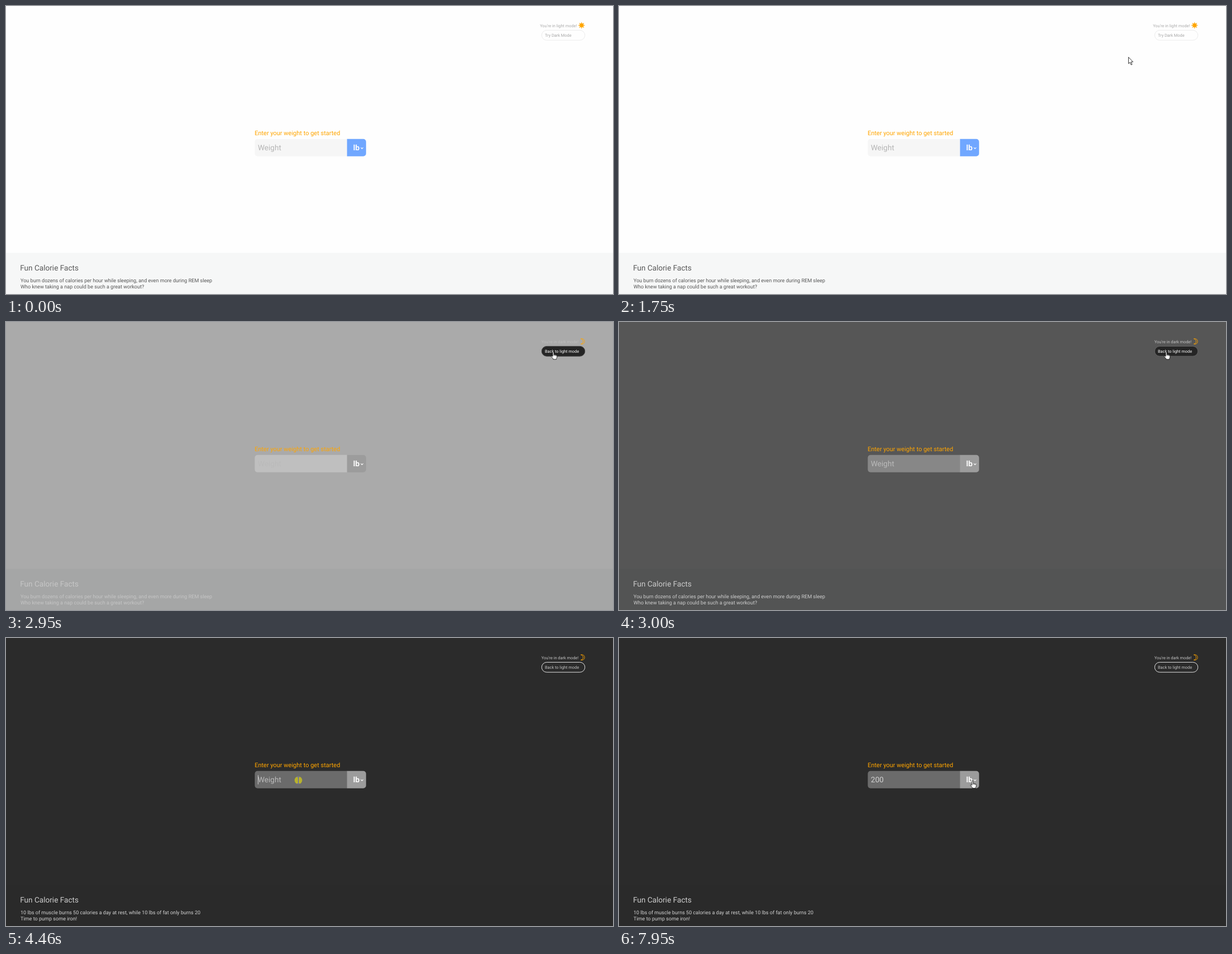
An HTML page that plays this animation: 1087 by 515 pixels, repeating every 8 s.

```html
<!DOCTYPE html>
<html lang="en">
<head>
<meta charset="utf-8">
<title>Calorie facts</title>
<style>
  html, body { margin: 0; width: 100%; height: 100%; overflow: hidden; background: #fefefe; }
  svg { display: block; width: 1087px; height: 515px; font-family: Roboto, sans-serif; text-rendering: geometricPrecision; }
  text { white-space: pre; }
  .small { font-size: 7.36px; }
  .body { font-size: 9.08px; }
  .big { font-size: 13.6px; }
  #beam { mix-blend-mode: difference; }
</style>
</head>
<body>
<svg viewBox="0 0 1087 515" xmlns="http://www.w3.org/2000/svg">
  <rect id="page" width="1087" height="515"/>
  <rect id="footer" y="441.5" width="1087" height="73.5"/>

  <text id="mode" class="small" y="37.5"></text>
  <g id="sun" fill="#ffa500" transform="translate(1030.8 34.6)">
    <circle r="3.5"/>
    <path id="rays"/>
  </g>
  <path id="moon" d="M1029.3 30Q1032.2 29.3 1034.4 30.9A5 5 0 0 1 1034.4 38.5Q1032.2 40.1 1029.3 39.4Q1033.4 38.4 1033.4 34.7T1029.3 30Z" fill="none" stroke="#ffa500" stroke-width=".9"/>
  <rect id="pill" x="959.3" y="43.4" width="77.4" height="17.8" rx="8.9"/>
  <text id="toggle" class="small" x="965" y="54.6"></text>

  <text x="445.2" y="230.9" font-size="11" fill="#ffa500">Enter your weight to get started</text>
  <path id="field" d="M611 237.7H450.5a5 5 0 0 0-5 5v21a5 5 0 0 0 5 5H611Z"/>
  <path id="unit" d="M610.7 237.7H639.8a5 5 0 0 1 5 5v21a5 5 0 0 1-5 5H610.7Z"/>
  <text id="value" class="big" x="451" y="258.1"></text>
  <rect id="caret" y="245.3" width=".9" height="16.4"/>
  <text class="big" x="621.8" y="258.1" font-weight="700" fill="#fff">lb</text>
  <path d="M635.4 253.2L637.5 255.2L639.6 253.2" fill="none" stroke="#fff" stroke-width="1.1"/>

  <text id="title" class="big" x="25.2" y="472.9">Fun Calorie Facts</text>
  <text id="fact1" class="body" x="26" y="494.1"></text>
  <text id="fact2" class="body" x="26" y="504.7"></text>

  <circle id="press" r="6.8" fill="#c8c21e" fill-opacity=".82"/>
  <path id="arrow" d="M0 0V11.6L2.6 9.2L4.6 13.7L6.4 12.9L4.5 8.5H8.1Z" fill="#fff" stroke="#000" stroke-width=".8"/>
  <g id="hand" stroke="#000" stroke-width=".75" stroke-linejoin="round">
    <path d="M-1 1Q-1 0 0 0T1.1 1V5Q2.3 4.2 3.2 5.3Q4.4 4.7 5.1 5.9Q6.6 5.6 6.7 7.2V9.4Q6.7 11 5.6 12.1V13.4H-.2V12.2L-3.4 8.6Q-4 7.2-2.6 7L-1 8.3Z" fill="#fff"/>
    <path d="M1.1 5V7M3.2 5.3V7.2M5.1 5.9V7.4" fill="none"/>
  </g>
  <path id="beam" d="M-2.4-6.2H-.8Q0-6.2 0-5.4Q0-6.2 .8-6.2H2.4M0-5.4V5.4M-2.4 6.2H-.8Q0 6.2 0 5.4Q0 6.2 .8 6.2H2.4" fill="none" stroke="#fff" stroke-width="1"/>
</svg>
<script>
const LOOP = 8000;
const el = {};
document.querySelectorAll('[id]').forEach(n => el[n.id] = n);

let rays = '';
for (let i = 0; i < 8; i++) {
  const a = i * Math.PI / 4;
  const at = (r, o) => (r * Math.cos(a + o)).toFixed(2) + ' ' + (r * Math.sin(a + o)).toFixed(2);
  rays += 'M' + at(3.9, -.27) + 'L' + at(6.2, 0) + 'L' + at(3.9, .27) + 'Z';
}
el.rays.setAttribute('d', rays);

// Pointer path: time, x, y
const path = [
  [230, 1024, 506], [620, 830, 384], [880, 662, 294], [1030, 594, 260],
  [1080, 576, 261], [1200, 541, 264], [1450, 680, 196], [1750, 911.8, 91.8],
  [1850, 933, 79], [2150, 964, 64], [2500, 979, 55], [2690, 980, 53.4],
  [3430, 980, 53.4], [3650, 860, 112], [3950, 588, 236], [4170, 522, 259],
  [4300, 522, 259], [4440, 523.5, 254.6], [4700, 523.6, 254.5], [4880, 525.2, 254],
  [6760, 525.2, 254], [7080, 546, 259], [7400, 561, 261],
  [7550, 561, 261], [7760, 612, 262], [7880, 634, 258.5], [7950, 633, 255.2]
];

const slope = (i, k) => {
  const a = path[i - 1], b = path[i], c = path[i + 1];
  if (!a || !c) return 0;
  const still = (p, q) => p[1] === q[1] && p[2] === q[2];
  return still(a, b) || still(b, c) ? 0 : (c[k] - a[k]) / (c[0] - a[0]);
};

function pointer(t) {
  const last = path.length - 1;
  if (t >= path[last][0]) return path[last].slice(1);
  let i = 0;
  while (t >= path[i + 1][0]) i++;
  const p = path[i], q = path[i + 1], dt = q[0] - p[0], u = (t - p[0]) / dt, v = 1 - u;
  return [1, 2].map(k =>
    p[k] * (1 + 2 * u) * v * v + q[k] * u * u * (3 - 2 * u) +
    dt * u * v * (slope(i, k) * v - slope(i + 1, k) * u));
}

// Same curve as the CSS "ease" keyword
function ease(x) {
  if (x <= 0) return 0;
  if (x >= 1) return 1;
  const bez = (s, a, b) => 3 * s * (1 - s) * ((1 - s) * a + s * b) + s ** 3;
  let lo = 0, hi = 1;
  for (let i = 0; i < 20; i++) {
    const mid = (lo + hi) / 2;
    if (bez(mid, .25, .25) < x) lo = mid; else hi = mid;
  }
  return bez(lo, .1, 1);
}

const within = (t, a, b) => t >= a && t < b;
const fade = (t, start) => ease((t - start) / 200);
const grey = v => `rgb(${v},${v},${v})`;
const mix = (a, b, p) => a + (b - a) * p;
const show = (n, on) => n.setAttribute('visibility', on ? 'visible' : 'hidden');
const fill = (n, c) => n.setAttribute('fill', c);
const say = (n, s) => { if (n.textContent !== s) n.textContent = s; };

const facts = [
  ['You burn dozens of calories per hour while sleeping, and even more during REM sleep',
   'Who knew taking a nap could be such a great workout?'],
  ['10 lbs of muscle burns 50 calories a day at rest, while 10 lbs of fat only burns 20',
   'Time to pump some iron!']
];

function render(t) {
  const dark = t >= 2900, d = fade(t, 2902);
  const hover = fade(t, 2200) * (1 - fade(t, 3470));

  fill(el.page, grey(mix(254, 43, d)));
  fill(el.footer, `rgb(${mix(246, 42, d)},${mix(247, 42, d)},${mix(247, 42, d)})`);
  fill(el.field, grey(mix(246, 107, d)));
  fill(el.unit, dark ? '#9c9c9c' : '#70a7ff');

  say(el.mode, dark ? "You're in dark mode!" : "You're in light mode!");
  el.mode.setAttribute('x', dark ? 958.8 : 956.2);
  fill(el.mode, dark ? grey(mix(184, 196, d)) : '#aaa');
  show(el.sun, !dark);
  show(el.moon, dark);

  fill(el.pill, '#252525');
  el.pill.setAttribute('fill-opacity', hover);
  el.pill.setAttribute('stroke', grey(mix(mix(236, 226, d), mix(34, 117, d), hover)));
  say(el.toggle, dark ? 'Back to light mode' : 'Try Dark Mode');
  fill(el.toggle, grey(mix(dark ? 196 : 165, 255, hover)));

  const typed = '200'.slice(0, (t >= 5760) + (t >= 5910) + (t >= 6090));
  say(el.value, typed || 'Weight');
  fill(el.value, typed ? '#d2d2d2' : dark ? '#bababa' : '#b5b5b5');
  el.caret.setAttribute('x', 451.1 + 7.637 * typed.length);
  fill(el.caret, '#d8d8d8');
  show(el.caret, within(t, 4440, 5020) || within(t, 5530, 6550) || within(t, 7060, 7580));

  const [line1, line2] = facts[t >= 3800 ? 1 : 0];
  say(el.fact1, line1);
  say(el.fact2, line2);
  fill(el.title, dark ? grey(mix(192, 206, d)) : '#585858');
  for (const n of [el.fact1, el.fact2]) fill(n, dark ? grey(mix(190, 210, d)) : '#555');

  let shape = '';
  if (t >= 230) {
    const [x, y] = pointer(t);
    const row = within(y, 238, 269);
    const onPill = within(x, 959, 1037) && within(y, 43, 61.5);
    shape = onPill || (row && within(x, 611, 645)) ? 'hand' : row && within(x, 445, 611) ? 'beam' : 'arrow';
    const move = `translate(${x.toFixed(2)} ${y.toFixed(2)})`;
    el[shape].setAttribute('transform', move);
    el.press.setAttribute('transform', move);
  }
  for (const n of ['arrow', 'hand', 'beam']) show(el[n], n === shape);
  show(el.press, within(t, 2730, 2880) || within(t, 4440, 4600));
}

const begin = performance.now();
function tick() {
  render((performance.now() - begin) % LOOP);
  requestAnimationFrame(tick);
}
render(0);
requestAnimationFrame(tick);
</script>
</body>
</html>
```
